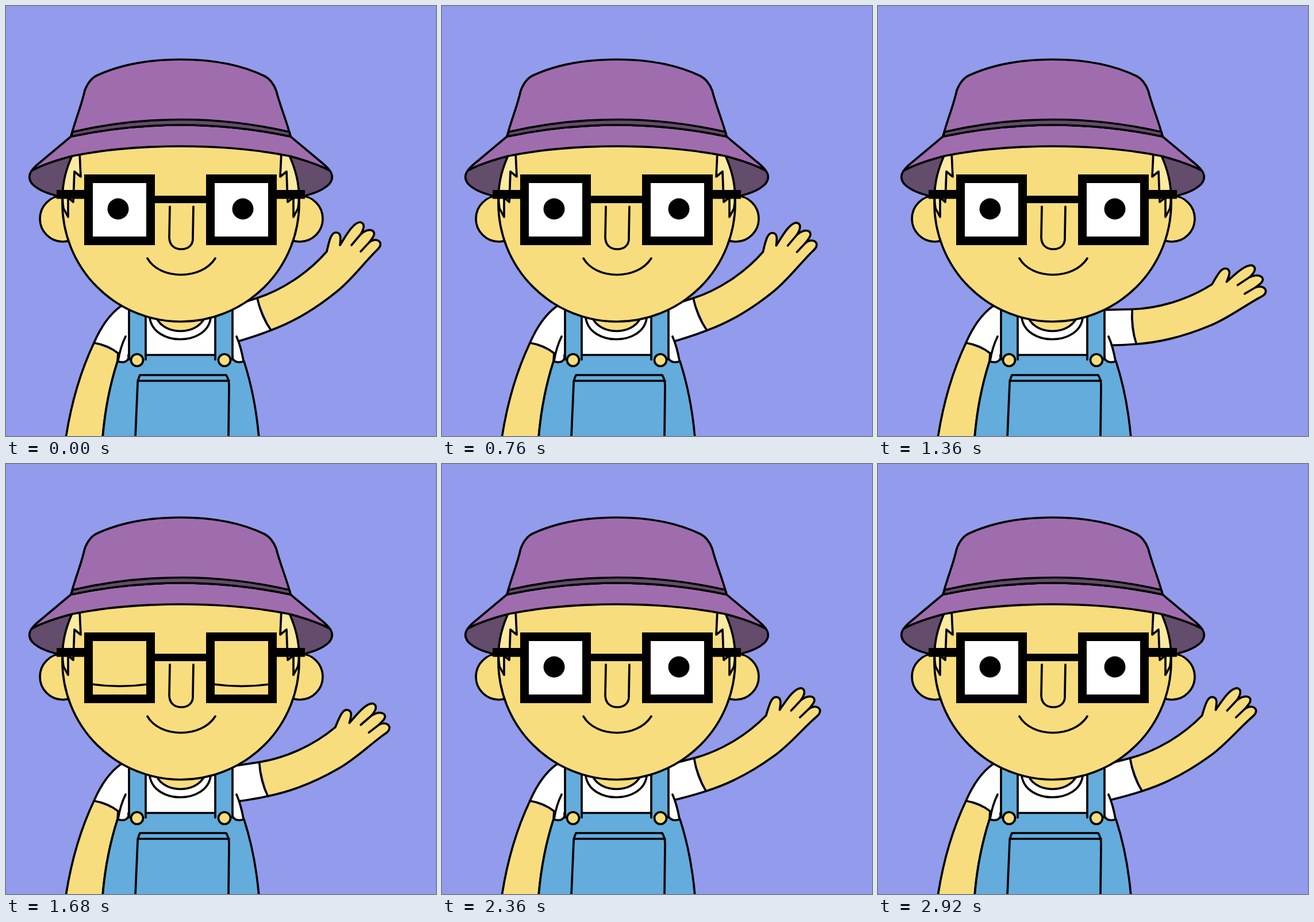
Animation of 748x748 px, one loop 3 s. Source, as an HTML page:

```html
<!DOCTYPE html>
<html lang="en">
<head>
<meta charset="utf-8">
<title>Waving character</title>
<style>
  html, body { margin: 0; width: 100%; height: 100%; overflow: hidden; background: #939bec; }
  svg { display: block; width: 100%; height: 100%; }
  .line { fill: none; }
  .skin { fill: #f8dd7f; }
  .white { fill: #fff; }
  .blue { fill: #63acdc; }
  .hat { fill: #9f6dae; }
  .shade { fill: #644c6c; }
  .hair { fill: #fbeaa0; }
  .bare { stroke: none; }
  .solid { fill: #000; stroke: none; }
</style>
</head>
<body>
<svg viewBox="0 0 748 748" stroke="#000" stroke-width="3.7" stroke-linecap="round" stroke-linejoin="round">
  <g id="arm">
    <path class="skin" d="M437 508C480 494 525 465 558 427C562 410 565 394 574 394C584 394 582 406 581 416C590 402 603 377 616 376C626 378 622 389 617 397C624 391 632 388 638 391C644 396 638 403 632 411C640 405 648 406 651 412C653 420 644 425 638 432C617 454 597 480 575 497C548 519 510 546 461 564"/>
    <path class="line" d="M617 397L601 416M632 411L617 427"/>
    <path class="white" d="M390 523L437 508Q444 540 461 564Q436 574 395 586"/>
  </g>

  <g id="body">
    <path class="skin" d="M153 586Q118 660 104 752H168Q174 680 194 618L195 604"/>
    <path class="white bare" d="M200 522H394V560L401 575 412 619H195V604Q178 590 153 586Q172 542 200 522"/>
    <path class="line" d="M200 522Q172 542 153 586Q178 590 195 604M208 575Q199 593 195 617M401 575Q409 593 413 617"/>
    <path class="skin bare" d="M262 543C276 573 331 573 345 543"/>
    <path class="line" d="M262 543C276 573 331 573 345 543M250 543C258 592 349 592 356 543"/>
    <path class="blue" d="M194 618Q208 623 213 613V607H394V613Q400 623 414 618Q434 680 440 752H168Q174 680 194 618"/>
    <path class="blue" d="M214 615V520H243V615M364 615V520H394V615"/>
    <path class="blue bare" d="M216 604H241V612H216ZM366 604H392V612H366Z"/>
    <circle class="skin" cx="228" cy="616" r="10.5"/>
    <circle class="skin" cx="380" cy="616" r="10.5"/>
    <path class="line" d="M225 750L229 657Q229 651 233 642H383Q388 650 388 660L387 750M229 652H388"/>
  </g>

  <g id="head">
    <path class="shade" d="M45 286Q72 272 115 261L304 244 493 261Q536 272 563 286Q572 298 562 310C550 322 532 327 513 332L408 280H200L95 332C76 327 58 322 46 310Q36 298 45 286"/>
    <circle class="skin" cx="99" cy="370" r="40"/>
    <circle class="skin" cx="511" cy="370" r="40"/>
    <circle class="skin" cx="304" cy="343" r="206"/>
    <path class="hair" d="M128 255L130 297 119 288 117 341 108 333 108 367 100 352Q93 308 116 258"/>
    <path class="hair" d="M479 255L477 297 488 288 490 341 500 333 500 367 508 352Q515 308 492 258"/>
    <path class="line" d="M285 349L284 402C284 416 293 423 305 423C317 423 326 416 325 402L326 349M246 439C268 477 340 477 364 439"/>
  </g>

  <g id="eyes">
    <path class="white bare" d="M148 304H248V404H148ZM360 304H460V404H360Z"/>
    <circle class="solid" cx="195" cy="353" r="18.5"/>
    <circle class="solid" cx="412" cy="353" r="18.5"/>
    <path id="lowerLids" class="skin bare" d="M148 383Q198 390 248 383V412H148ZM360 383Q410 390 460 383V412H360Z"/>
    <g id="upperLids">
      <path class="skin bare" d="M148 383Q198 390 248 383V302H148ZM360 383Q410 390 460 383V302H360Z"/>
      <path class="line" d="M148 383Q198 390 248 383M360 383Q410 390 460 383"/>
    </g>
  </g>

  <g id="hat">
    <path class="hat" d="M113 227L64 268Q50 279 45 286Q72 272 115 261Q200 244 304 244Q408 244 493 261Q536 272 563 286Q558 279 544 268L495 227Q304 187 113 227"/>
    <path class="hat" d="M113 227C122 193 130 178 137 147Q145 126 160 120Q220 93 304 93Q390 93 450 122Q463 129 470 147C478 178 487 196 495 227Q304 187 113 227"/>
    <path class="shade" d="M116 219Q304 176 493 219L495 227Q304 187 113 227Z"/>
  </g>

  <g id="glasses">
    <path class="line" stroke-width="15" stroke-linejoin="miter" d="M143.5 300.5H251.5V408.5H143.5ZM355.5 300.5H463.5V408.5H355.5Z"/>
    <path class="solid" d="M255 330H352V343H255ZM88 320H140V335.5H88ZM468 320H520V335.5H468Z"/>
  </g>
</svg>
<script>
const LOOP = 3000, TICK = 40, SWING = 30;

// How many ticks each drawn pose is held.
const holds = [...'322221212' + '2222222' + '2221111111' + '1' + '223' + '12222' + '22121222'].map(Number);

// Moments of the swing extremes: [ms, half swings]; even is raised, odd is lowered.
const extremes = [[60, 0], [446, 1], [1194, 3], [1547, 4], [1959, 5], [2325, 6], [3035, 8]];

const find = id => document.getElementById(id);
const clamp = x => Math.max(0, Math.min(1, x));
const smooth = x => x * x * (3 - 2 * x);
const ramp = (t, from, to) => smooth(clamp((t - from) / (to - from)));

function heldTime(t) {
  let start = 0;
  for (const ticks of holds) {
    const end = start + ticks * TICK;
    if (t < end) return (start + end) / 2;
    start = end;
  }
  return t;
}

function armAngle(t) {
  const next = Math.max(1, extremes.findIndex(([ms]) => ms > t));
  const [t0, h0] = extremes[next - 1], [t1, h1] = extremes[next];
  const half = h0 + (h1 - h0) * clamp((t - t0) / (t1 - t0));
  return SWING * (1 - Math.cos(Math.PI * half)) / 2;
}

function draw(now) {
  const t = heldTime(now % LOOP);
  const open = 1 - ramp(t, 1480, 1650) + ramp(t, 1710, 1850);
  find('arm').setAttribute('transform', `rotate(${armAngle(t)} 372 536)`);
  find('upperLids').setAttribute('transform', `translate(0 ${-86 * open})`);
  find('lowerLids').setAttribute('transform', `translate(0 ${22 * open})`);
}

let begin;
function frame(now) {
  begin ??= now;
  draw(now - begin);
  requestAnimationFrame(frame);
}
draw(0);
requestAnimationFrame(frame);
</script>
</body>
</html>
```
